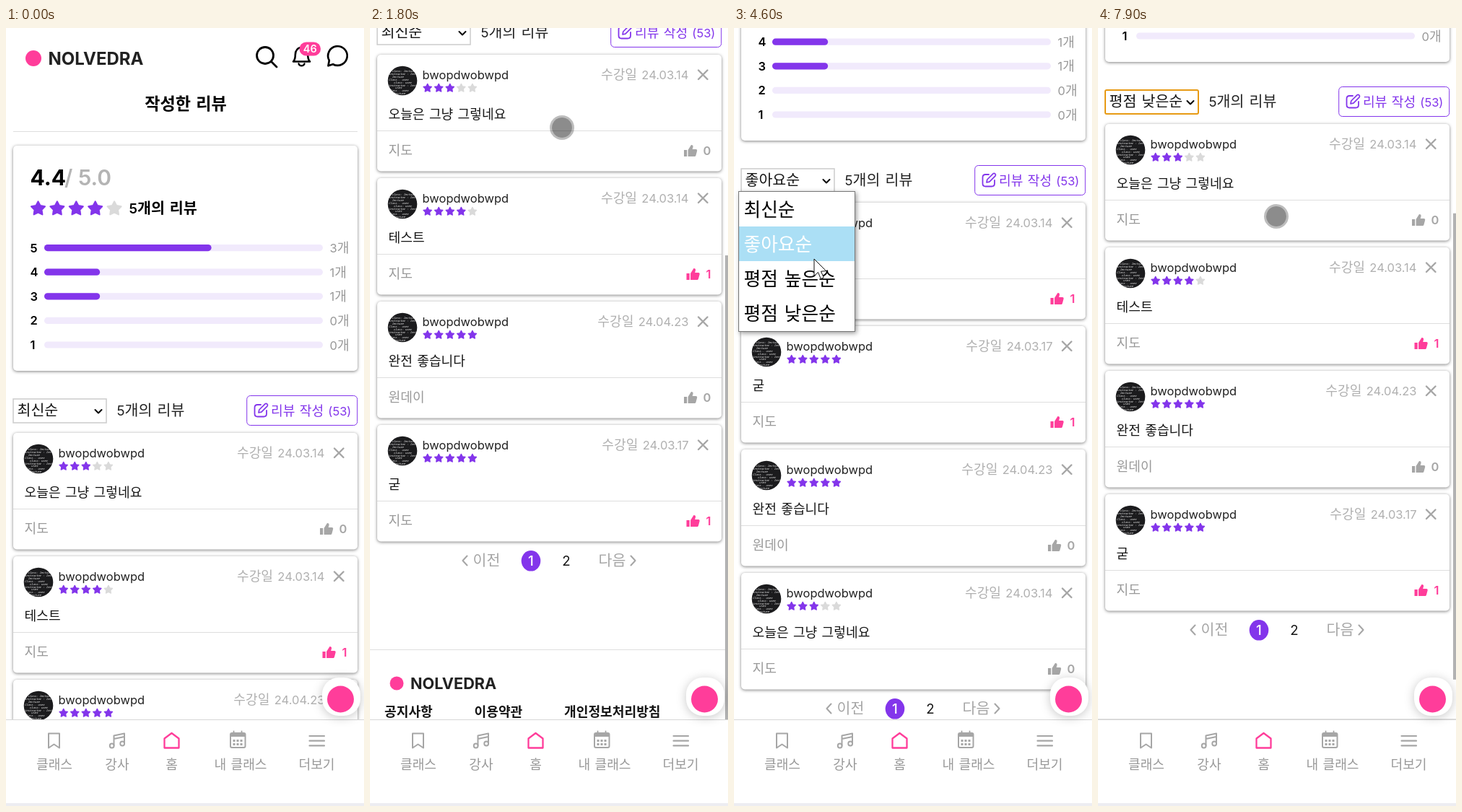
Write an HTML page that moves like this. It is 496 by 1078 pixels and loops after 8000 ms.

```html
<!DOCTYPE html>
<html lang="ko">
<head>
<meta charset="utf-8">
<title>작성한 리뷰</title>
<style>
  html, body { margin: 0; width: 100%; height: 100%; overflow: hidden; background: #fff; }
  svg { display: block; width: 496px; height: 1078px; }
  text { font-family: Inter, "Noto Sans CJK KR", "Noto Sans CJK", sans-serif; white-space: pre; }
  .hangul { word-spacing: .1em; }
  .code { font-family: "Noto Sans Mono", monospace; font-size: 3.8px; font-style: italic; fill: #f2f2f2; }
  .card { fill: #fff; filter: drop-shadow(0 1px 2px rgba(0, 0, 0, .5)); }
  .line { fill: none; stroke-linecap: round; stroke-linejoin: round; }
</style>
</head>
<body>
<svg id="stage" viewBox="0 0 496 1078" xmlns="http://www.w3.org/2000/svg"></svg>
<script>
const LOOP = 8000, STEP = 100;
const PURPLE = '#8335eb', PINK = '#ff3d9a', GRAY = '#a6a6a6', INK = '#151515', RULE = '#dedede';
const USER = 'bwopdwobwpd', BRAND = 'NOLVEDRA';
const SORTS = ['최신순', '좋아요순', '평점 높은순', '평점 낮은순'];

// Text centred vertically on cy; Hangul runs are set larger and lighter than Latin.
function text(x, cy, size, str, fill = INK, weight = 400, anchor = 'start') {
  const hangul = /[가-힣]/.test(str), thin = weight > 400 ? weight : 300;
  const body = str.replace(/[가-힣]+/g, run => `<tspan font-size="${size * 1.1}" font-weight="${thin}">${run}</tspan>`);
  const y = cy + size * (hangul ? .4 : .364);
  return `<text x="${x}" y="${y}" font-size="${size}" fill="${fill}" font-weight="${weight}" text-anchor="${anchor}"${hangul ? ' class="hangul"' : ''}>${body}</text>`;
}
const line = (d, color, width) => `<path class="line" d="${d}" stroke="${color}" stroke-width="${width}"/>`;
const rect = (x, y, w, h, attrs) => `<rect x="${x}" y="${y}" width="${w}" height="${h}" ${attrs}/>`;
const circle = (x, y, r, fill) => `<circle cx="${x}" cy="${y}" r="${r}" fill="${fill}"/>`;
const group = (x, y, body, attrs = '') => `<g transform="translate(${x} ${y})" ${attrs}>${body}</g>`;

function stars(x, y, gap, r, count) {
  let out = '';
  for (let i = 0; i < 5; i++) {
    const pts = Array.from({ length: 10 }, (_, k) => {
      const a = k * Math.PI / 5, d = k % 2 ? r * .52 : r;
      return `${(x + i * gap + d * Math.sin(a)).toFixed(2)},${(y - d * Math.cos(a)).toFixed(2)}`;
    }).join(' ');
    const color = i < count ? PURPLE : '#dadada';
    out += `<polygon points="${pts}" fill="${color}" stroke="${color}" stroke-width="${r * .22}" stroke-linejoin="round"/>`;
  }
  return out;
}

function header() {
  return circle(38, 42, 11, PINK) + text(58.5, 42, 24, BRAND, '#222', 700)
    + `<circle cx="359" cy="38" r="11.5" fill="none" stroke="#000" stroke-width="2.8"/>`
    + line('M367.5 46.5L375 54', '#000', 2.8)
    + line('M398 46.5c2.6-2.5 2.8-5 2.8-9.5c0-6 3.7-10 8.7-10s8.7 4 8.7 10c0 4.5 .2 7 2.8 9.5z', '#000', 2.6)
    + line('M405.5 49.5a4.2 4.2 0 0 0 8 0', '#000', 2.4)
    + rect(406.5, 19.5, 29.5, 19, `rx="9.5" fill="${PINK}"`)
    + text(421.3, 29, 14.5, '46', '#fff', 600, 'middle')
    + line('M446.5 52.3l1.3-7.3a13.3 13.3 0 1 1 5.2 5.2z', '#000', 2.7)
    + text(249, 105, 21, '작성한 리뷰', '#000', 600, 'middle')
    + rect(10, 143, 477, 1, `fill="${RULE}"`);
}

function summary() {
  let out = rect(10, 163, 477, 312, 'rx="5" class="card"')
    + text(33.5, 207, 30, '4.4', '#000', 700) + text(81, 207, 30, '/ 5.0', '#b4b4b4', 600)
    + stars(44.5, 250.3, 26.4, 9.9, 4) + text(170.5, 249, 18.8, '5개의 리뷰', '#000', 600);
  [3, 1, 1, 0, 0].forEach((n, i) => {
    const y = 304.6 + i * 33.6;
    out += text(33.5, y, 16.5, String(5 - i), '#000', 600)
      + rect(53, y - 4.6, 386, 9.2, 'rx="4.6" fill="#f1eafc"')
      + (n ? rect(53, y - 4.6, 386 * n / 5, 9.2, `rx="4.6" fill="${PURPLE}"`) : '')
      + text(448.5, y, 16.5, n + '개', '#999');
  });
  return out;
}

function toolbar() {
  return rect(10, 514, 129, 33, 'id="select" fill="#fff"')
    + SORTS.map((s, i) => `<g id="sort${i}">${text(15.5, 530, 18.7, s)}</g>`).join('')
    + line('M123.5 529l4.5 4.5l4.5-4.5', '#000', 2)
    + text(153.5, 530, 18.7, '5개의 리뷰', '#222')
    + rect(333.7, 509.5, 153, 41, `rx="5" fill="#fff" stroke="${PURPLE}"`)
    + line('M353 522h-4.5q-4 0-4 4v8.5q0 4 4 4h8.5q4 0 4-4v-4.5', PURPLE, 1.8)
    + line('M350 533l.8-4l8.2-8.2q1.5-1 2.8 .3t.3 2.8l-8.2 8.2z', PURPLE, 1.7)
    + text(367, 530, 16.5, '리뷰 작성 (53)', PURPLE);
}

const REVIEWS = {
  plain: ['24.03.14', 3, '오늘은 그냥 그렇네요', '지도', 0],
  test: ['24.03.14', 4, '테스트', '지도', 1],
  full: ['24.04.23', 5, '완전 좋습니다', '원데이', 0],
  good: ['24.03.17', 5, '굳', '지도', 1],
  great: ['24.03.09', 5, '아따 끝내 주더만', '원데이', 0]
};
const byLatest = ['plain', 'test', 'full', 'good'];
const ORDERS = [byLatest, ['test', 'good', 'full', 'plain'], ['full', 'good', 'great', 'test'], byLatest];

function review([date, score, body, lesson, likes], i) {
  const tone = likes ? PINK : GRAY;
  const thumb = '<path d="M0 7h4.2v9h-4.2zM5.6 7l4.4-7c2 0 3 1 2.5 3l-.8 3h4.8c1.5 0 1.9 1.2 1.6 2.4l-1.6 6c-.4 1.2-1 1.6-2 1.6h-8.9z"/>';
  return group(0, 561 + i * 171,
    rect(10, 0, 477, 161.5, 'rx="5" class="card"')
    + '<use href="#avatar" x="45" y="36"/>'
    + text(72.5, 27.5, 16.5, USER, '#222') + stars(79.7, 46.3, 15.55, 5.9, score)
    + text(441.5, 27, 16.5, '수강일 ' + date, '#b0b0b0', 400, 'end')
    + line('M455 21.5l12.5 12.5m0-12.5l-12.5 12.5', GRAY, 2.4)
    + text(25.5, 82.5, 16.5, body)
    + rect(10, 105, 477, 1, `fill="${RULE}"`)
    + text(25.5, 132.5, 16.5, lesson, '#999')
    + group(likes ? 438.5 : 435, 125, thumb, `fill="${tone}"`)
    + text(472.5, 133, 16.5, String(likes), tone, 600, 'end'));
}

function footer() {
  return line('M134.5 1255.5l-6 6.5l6 6.5M361.5 1255.5l6 6.5l-6 6.5', GRAY, 2)
    + text(142.5, 1262, 18.7, '이전', GRAY) + text(316.5, 1262, 18.7, '다음', GRAY)
    + `<ellipse cx="223" cy="1262.3" rx="13.3" ry="14.3" fill="${PURPLE}"/>`
    + text(223, 1262, 18.7, '1', '#fff', 500, 'middle') + text(272, 1262, 18.7, '2', INK, 400, 'middle')
    + rect(0, 1385, 496, 1, `fill="${RULE}"`)
    + circle(37, 1432, 9.5, PINK) + text(56, 1432, 21.7, BRAND, '#222', 700)
    + text(20, 1471, 16.5, '공지사항', INK, 600) + text(144.5, 1471, 16.5, '이용약관', INK, 600)
    + text(269, 1471, 16.5, '개인정보처리방침', INK, 600);
}

function nav() {
  const labels = [[67, '클래스'], [154, '강사'], [229.5, '홈'], [325, '내 클래스'], [430.5, '더보기']];
  let dots = '';
  for (let i = 0; i < 6; i++) dots += rect(314.5 + i % 3 * 5, 986 + (i > 2) * 5, 3, 3, `fill="${GRAY}"`);
  return rect(0, 958, 496, 120, 'fill="#fff"') + rect(0, 958, 496, 1, 'fill="#d6d6d6"')
    + rect(0, 1074, 496, 4, 'fill="#ededf1"')
    + line('M59 977.5h15v20l-7.5-5l-7.5 5z', GRAY, 2)
    + line('M149.5 994v-13.5l14.5-3v13.5M149.5 985l14.5-3', GRAY, 2)
    + `<g fill="none" stroke="${GRAY}" stroke-width="2"><circle cx="146.7" cy="994.5" r="2.9"/><circle cx="161.2" cy="991.5" r="2.9"/></g>`
    + line('M219.5 984.5l10-7.5l10 7.5v13h-20z', PINK, 2.3)
    + rect(311, 977, 20.5, 20, `rx="2" fill="none" stroke="${GRAY}" stroke-width="2"`)
    + rect(311, 977, 20.5, 5, `fill="${GRAY}"`) + line('M315.5 974.5v4m11-4v4', GRAY, 2) + dots
    + line('M420.5 981h20.5m-20.5 6.7h20.5m-20.5 6.7h20.5', GRAY, 2.2)
    + labels.map(([x, s]) => text(x, 1020.5, 16.5, s, '#999', 400, 'middle')).join('');
}

function menu() {
  return rect(6.5, 226.5, 161, 194, 'fill="#fff" stroke="#777" style="filter:drop-shadow(2px 2px 3px rgba(0,0,0,.4))"')
    + rect(7, 227, 160, 48, 'id="hover" fill="#abdff5"')
    + SORTS.map((s, i) => `<g id="item${i}">${text(13.5, 251.5 + i * 48, 23.4, s, 'currentColor')}</g>`).join('');
}

const codeLines = ['  class: lecturer', 'instructor : lecture', '  lecture', 'Class.. user', '   class: user',
  'instructor : lecture', '    user', 'Class.. user', '   lecture'];
const avatar = `<clipPath id="round"><circle r="20.3"/></clipPath>
  <g id="avatar"><circle r="20.3" fill="#1b1b1d"/><g clip-path="url(#round)">`
  + codeLines.map((s, i) => `<text class="code" x="-19" y="${-12 + i * 3.9}">${s}</text>`).join('') + '</g></g>';

const stage = document.getElementById('stage');
stage.innerHTML = `<defs>${avatar}</defs><rect width="496" height="1078" fill="#fff"/>`
  + `<g id="page">${header()}${summary()}${toolbar()}`
  + ORDERS.map((keys, i) => `<g id="list${i}">${keys.map((k, n) => review(REVIEWS[k], n)).join('')}</g>`).join('')
  + footer() + '</g>'
  + rect(492, 0, 4, 646, 'id="thumb" fill="#b2b2b2"')
  + nav()
  + rect(438, 900, 53, 53, 'rx="23" fill="#fff" style="filter:drop-shadow(0 2px 7px rgba(0,0,0,.22))"')
  + circle(463.5, 930, 18.5, PINK)
  + `<g id="menu">${menu()}</g>`
  + '<g id="touch"><circle r="14" fill="#000" fill-opacity=".45"/><circle r="15.5" fill="none" stroke="#000" stroke-opacity=".26" stroke-width="3"/></g>'
  + '<path id="cursor" d="M0 0v23.5l5.5-5l3.8 9l4-1.7l-3.8-8.6l7.2-.5z" fill="#fff" stroke="#111" stroke-linejoin="round"/>';

const el = id => document.getElementById(id);
const show = (node, on) => { node.style.display = on ? '' : 'none'; };
const place = (node, [x, y]) => node.setAttribute('transform', `translate(${x} ${y})`);

// Linear interpolation over keys [time, ...values].
function track(keys, t) {
  const n = keys.findIndex(k => k[0] > t);
  if (n === 0) return keys[0].slice(1);
  if (n < 0) return keys[keys.length - 1].slice(1);
  const a = keys[n - 1], b = keys[n], p = (t - a[0]) / (b[0] - a[0]);
  return a.slice(1).map((v, i) => v + (b[i + 1] - v) * p);
}
const active = (paths, t) => paths.find(p => t >= p[0][0] && t <= p[p.length - 1][0]);

const SCROLL = [[100, 0], [300, 10], [800, 163], [1000, 225], [1200, 250], [1800, 524], [2000, 524],
  [2500, 319], [7300, 319], [7900, 428]];
const TOUCHES = [
  [[100, 384, 375], [300, 380, 361], [800, 366, 208], [1000, 360, 146]],
  [[1200, 285, 412], [1800, 266, 138], [2000, 266, 138], [2500, 252, 343]],
  [[2600, 100, 212], [2700, 100, 212]],
  [[4000, 101, 213], [4200, 101, 213]],
  [[5600, 102, 213], [5900, 102, 213]],
  [[7100, 210, 390], [7300, 217, 370], [7900, 247, 261]]
];
const CURSORS = [
  [[2800, 90, 230], [2900, 95, 273], [3200, 92, 292], [3399, 92, 292]],
  [[4300, 100, 225], [4600, 111, 320], [4900, 108, 350], [5099, 108, 350]],
  [[6000, 100, 240], [6100, 104, 305], [6200, 105, 318], [6800, 108, 403], [6999, 108, 403]]
];
const BAR = [[100, 0], [200, 1], [2500, 1], [2800, 0], [7200, 0], [7300, 1]];

function draw(t) {
  const [scroll] = track(SCROLL, t);
  const sort = [3400, 5100, 7000].filter(at => t >= at).length;
  place(el('page'), [0, -scroll]);
  el('thumb').setAttribute('y', .607 * scroll - 3);
  el('thumb').setAttribute('opacity', track(BAR, t)[0]);

  const drag = active(TOUCHES, t), path = active(CURSORS, t);
  show(el('touch'), drag);
  if (drag) place(el('touch'), track(drag, t));

  show(el('menu'), path);
  show(el('cursor'), path);
  let hover = sort;
  if (path) {
    const pos = track(path, t);
    place(el('cursor'), pos);
    hover = Math.max(sort, Math.floor((pos[1] - 248) / 48));
  }
  el('hover').setAttribute('y', 227 + hover * 48);

  const focus = sort > 0 && !path, select = el('select');
  select.setAttribute('stroke', focus ? '#e79a14' : '#cfcfcf');
  select.setAttribute('stroke-width', focus ? 2 : 1.6);
  select.setAttribute('rx', focus ? 2 : 0);
  SORTS.forEach((_, i) => {
    show(el('sort' + i), i === sort);
    show(el('list' + i), i === sort);
    el('item' + i).style.color = i === hover ? '#fff' : '#000';
  });
}

const start = performance.now();
function tick() {
  const t = (performance.now() - start) % LOOP;
  draw(Math.floor(t / STEP) * STEP);
  requestAnimationFrame(tick);
}
tick();
</script>
</body>
</html>
```
